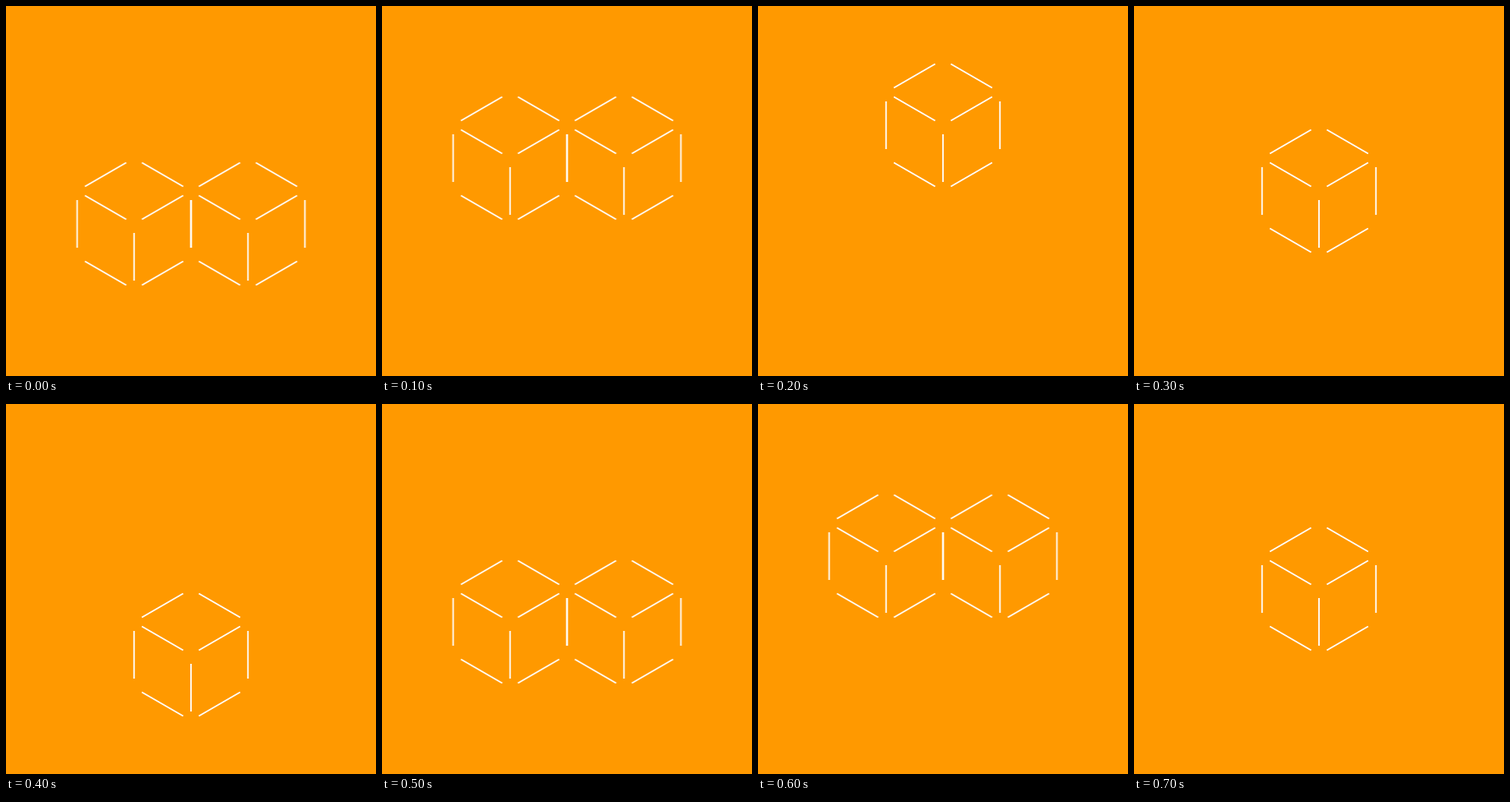
An HTML page for the animation above (0.8 s loop, 450 px wide and 450 px high).

```html
<!DOCTYPE html>
<html lang="en">
<head>
<meta charset="utf-8">
<title>Cubes</title>
<style>
html, body { margin: 0; width: 100%; height: 100%; overflow: hidden; background: #ff9900; }
svg { display: block; width: 100%; height: 100%; }
.cube { fill: none; stroke: #fff; stroke-width: 1.8; }
.main { animation: main 800ms step-end infinite; }
.twin { animation: twin 800ms step-end infinite; }

/* Cells of a 2x2x2 block, one level per 100 ms */
@keyframes main {
  0%    { transform: translate(155.72px, 265px); }
  12.5% { transform: translate(155.72px, 185px); }
  25%   { transform: translate(225px, 145px); }
  37.5% { transform: translate(225px, 225px); }
  50%   { transform: translate(225px, 305px); }
  62.5% { transform: translate(155.72px, 265px); }
  75%   { transform: translate(155.72px, 185px); }
  87.5%, 100% { transform: translate(225px, 225px); }
}
/* Mirror cube, shown only for the side cells */
@keyframes twin {
  0%    { transform: translate(294.28px, 265px); visibility: visible; }
  12.5% { transform: translate(294.28px, 185px); visibility: visible; }
  25%   { transform: translate(294.28px, 185px); visibility: hidden; }
  62.5% { transform: translate(294.28px, 265px); visibility: visible; }
  75%   { transform: translate(294.28px, 185px); visibility: visible; }
  87.5%, 100% { transform: translate(294.28px, 185px); visibility: hidden; }
}
</style>
</head>
<body>
<svg viewBox="0 0 450 450">
  <defs>
    <path id="cube" d="
      M-9.53-74.5L-59.75-45.5 M9.53-74.5L59.75-45.5
      M-59.75-34.5L-9.53-5.5 M59.75-34.5L9.53-5.5
      M-59.75 45.5L-9.53 74.5 M59.75 45.5L9.53 74.5
      M-69.28-29V29 M69.28-29V29 M0 11V69"/>
  </defs>
  <g class="cube main"><use href="#cube"/></g>
  <g class="cube twin"><use href="#cube"/></g>
</svg>
</body>
</html>
```
